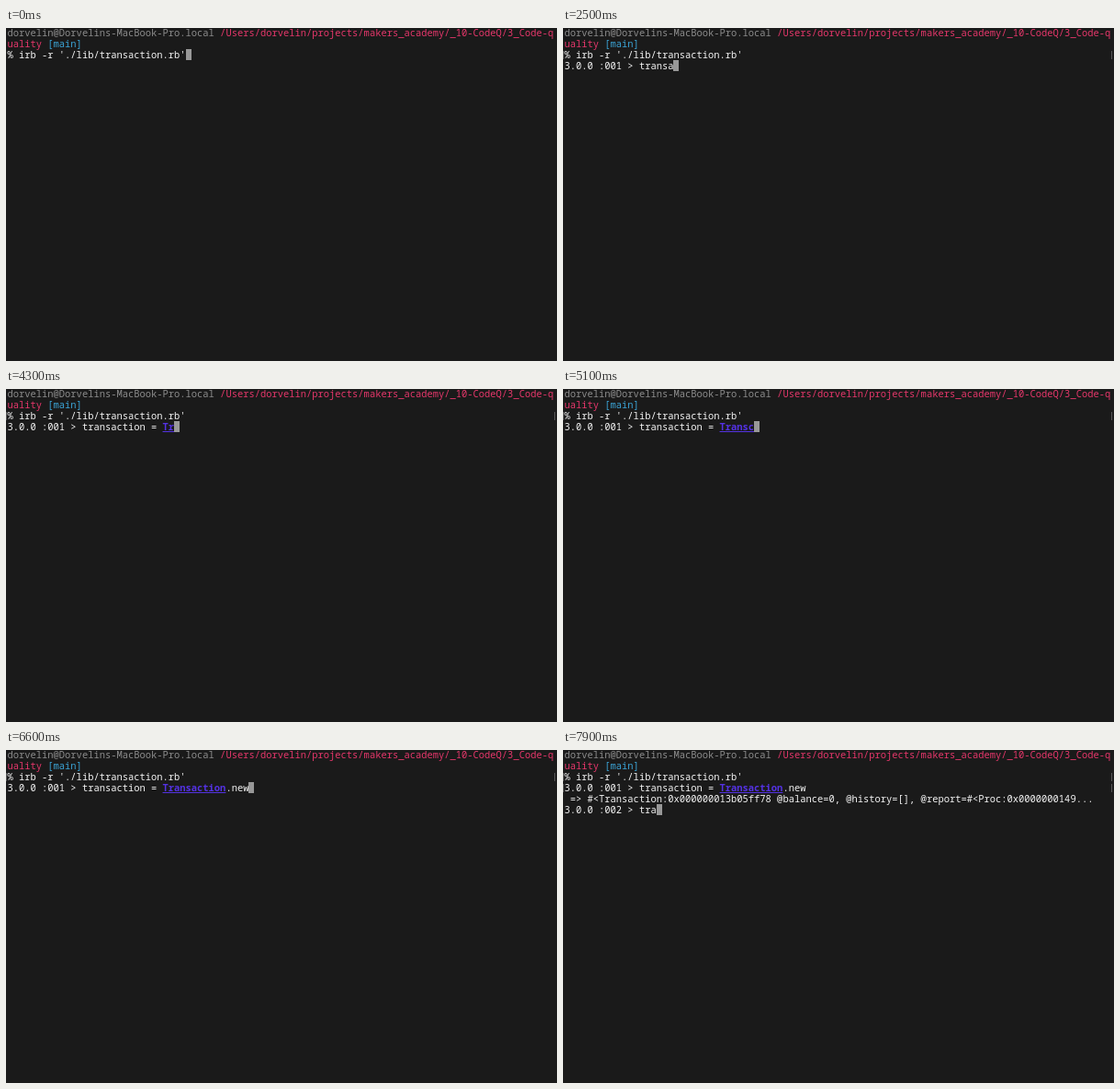
Write an HTML page with a canvas that moves like this. It is 600 by 363 pixels and loops after 8000 ms.

```html
<!DOCTYPE html>
<html lang="en">
<head>
<meta charset="utf-8">
<title>Terminal session</title>
<style>
  html, body { margin: 0; width: 100%; height: 100%; overflow: hidden; background: #1a1a1a; }
  canvas { display: block; }
</style>
</head>
<body>
<canvas id="stage" width="600" height="363"></canvas>
<script>
const ctx = document.getElementById('stage').getContext('2d');
const LOOP = 8000;
const CELL = 6.26, ROW = 12, LEFT = 1.5, TOP = -1, BASELINE = 9.7;
const FONT = '10.43px "Noto Sans Mono", "DejaVu Sans Mono", monospace';
const COLOR = {
  back: '#1a1a1a', text: '#f4f4f4', host: '#8c8c8c', path: '#e5376b',
  branch: '#3ba4d6', constant: '#5432e4', cursor: '#989898', mark: '#555555'
};

const COMMAND = "% irb -r './lib/transaction.rb'";
const RESULT = ' => #<Transaction:0x000000013b05ff78 @balance=0, @history=[], @report=#<Proc:0x0000000149...';
const ENTER_COMMAND = 1000, PROMPT_READY = 1500, ENTER_LINE = 7000;

// Each burst: start time, time per key, keys ("\b" is backspace).
const FIRST_LINE = [
  [2000, 100, 'transaction'], [3200, 200, ' ='], [3700, 300, ' Tr'],
  [4400, 100, 'an'], [4800, 200, 'sc'],
  [5700, 80, '\baction.new']
];
const SECOND_LINE = [[7700, 100, 'tra']];

function typed(bursts, time) {
  let line = '';
  for (const [start, step, keys] of bursts) {
    [...keys].forEach((key, i) => {
      if (time < start + i * step) return;
      line = key === '\b' ? line.slice(0, -1) : line + key;
    });
  }
  return line;
}

const cellX = col => LEFT + col * CELL;
const rowY = row => TOP + row * ROW;

// Writes on the character grid and returns the next free column.
function write(text, col, row, color = COLOR.text, weight = '') {
  ctx.font = `${weight} ${FONT}`;
  ctx.fillStyle = color;
  for (const char of text) ctx.fillText(char, cellX(col++), rowY(row) + BASELINE);
  return col;
}

function writeConstant(text, col, row) {
  const end = write(text, col, row, COLOR.constant, 'bold');
  ctx.fillRect(cellX(col), rowY(row) + 11, (end - col) * CELL, 1);
  return end;
}

function writeRuby(line, col, row) {
  for (const part of line.split(/([A-Z]\w*)/)) {
    col = /^[A-Z]/.test(part) ? writeConstant(part, col, row) : write(part, col, row);
  }
  return col;
}

function cursor(col, row) {
  ctx.fillStyle = COLOR.cursor;
  ctx.fillRect(Math.round(cellX(col)), rowY(row), 6, ROW);
}

function mark(row) {
  ctx.fillStyle = COLOR.mark;
  ctx.fillRect(0, rowY(row) + 2, 1, 9);
  ctx.fillRect(597, rowY(row) + 2, 1, 9);
}

function draw(time) {
  ctx.fillStyle = COLOR.back;
  ctx.fillRect(0, 0, 600, 363);

  const col = write('dorvelin@Dorvelins-MacBook-Pro.local ', 0, 0, COLOR.host);
  write('/Users/dorvelin/projects/makers_academy/_10-CodeQ/3_Code-q', col, 0, COLOR.path);
  write('[main]', write('uality ', 0, 1, COLOR.path), 1, COLOR.branch);

  const commandEnd = write(COMMAND, 0, 2);
  if (time < ENTER_COMMAND) return cursor(commandEnd, 2);
  mark(2);
  if (time < PROMPT_READY) return cursor(0, 3);

  const lineEnd = writeRuby(typed(FIRST_LINE, time), write('3.0.0 :001 > ', 0, 3), 3);
  if (time < ENTER_LINE) return cursor(lineEnd, 3);
  mark(3);
  write(RESULT, 0, 4);
  cursor(writeRuby(typed(SECOND_LINE, time), write('3.0.0 :002 > ', 0, 5), 5), 5);
}

const begin = performance.now();
function tick() {
  draw((performance.now() - begin) % LOOP);
  requestAnimationFrame(tick);
}
tick();
</script>
</body>
</html>
```
